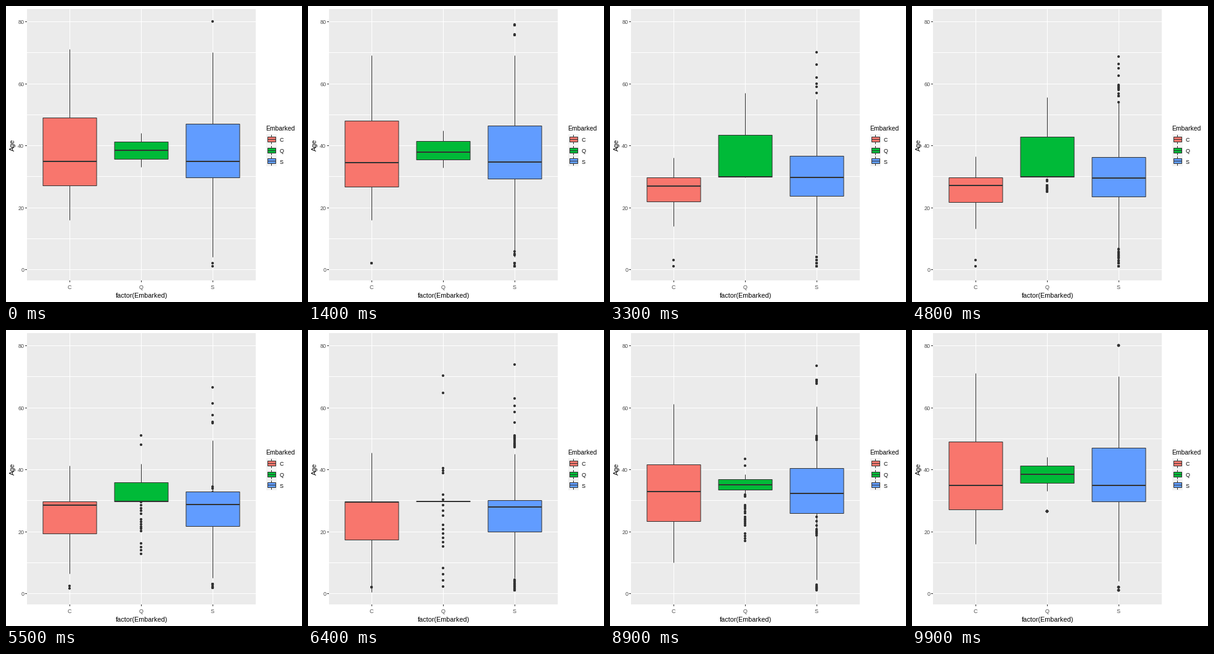
Recreate the animation shown at these times as a matplotlib script. Size 480 px wide and 480 px high, loop 10 s.

```python
import math

import matplotlib.pyplot as plt
import numpy as np
from matplotlib.animation import FuncAnimation
from matplotlib.patches import PathPatch, Rectangle
from matplotlib.path import Path

plt.rcParams["font.family"] = "Liberation Sans"
plt.rcParams["path.snap"] = False  # all lines sit on exact pixel centres

SIZE, DPI = 480, 72
FRAMES, INTERVAL = 100, 100
DARK = "#333333"
NAMES = ["C", "Q", "S"]
FILLS = ["#F8766D", "#00BA38", "#619CFF"]
CENTERS = [103.5 + 116 * i for i in range(3)]
HALF = 43.5
MEAN_AGE = 29.7


def lows(n):
    """Infant ages 1 to 4, over and over."""
    return [1 + i % 4 for i in range(n)]


def runs(*spans):
    """Evenly spaced ages, one (first, last, count) per span."""
    return [age for span in spans for age in np.linspace(*span)]


# Per group, one box per class: low, q1, median, q3, high
STATS = [
    [(16, 27, 35, 49, 71), (14, 22, 27, MEAN_AGE, 36),
     (0.42, 17.25, MEAN_AGE, MEAN_AGE, 45.5)],
    [(33, 35.75, 38.5, 41.25, 44), (MEAN_AGE, 29.85, 30, 43.5, 57),
     (MEAN_AGE,) * 5],
    [(4, MEAN_AGE, 35, 47, 70), (5, 23.75, MEAN_AGE, 36.65, 55),
     (5, 20, 28, 30, 45)],
]
OUTLIERS = [
    [[], [1, 3], []],
    [[], [], runs((2, 8, 4), (15, 22, 6), (25, 32, 5), (39, 40.5, 3),
                  (65, 70.5, 2))],
    [[80, 2, 1],
     [59] + lows(2) + [60, 57] + lows(8) + [70, 66, 62],
     runs((63, 59, 3)) + [51, 74, 55.5] + runs((51, 47, 9)) + lows(18)],
]
# First frame, last frame, class left, class reached
MOVES = [(8, 33, 0, 1), (42, 67, 1, 2), (76, 100, 2, 0)]


def age_y(age):
    return 25.6 + (80 - age) * 5.026


def row(age):
    """Centre of the pixel row that holds an age."""
    return math.floor(age_y(age)) + 0.5


def ease(t):
    return 4 * t ** 3 if t < 0.5 else 1 - 4 * (1 - t) ** 3


def locate(frame):
    """Classes on both sides of the current moment, and eased progress."""
    state = 0
    for start, end, a, b in MOVES:
        if start < frame < end:
            return a, b, ease((frame - start) / (end - start))
        if frame >= end:
            state = b
    return state, state, 0


def mix(a, b, p):
    return [u + (v - u) * p for u, v in zip(a, b)]


def match(values, other):
    """Repeat values to the length of other; an empty list grows from the mean."""
    n = max(len(values), len(other))
    if not values and other:
        values = [sum(other) / len(other)]
    return [values[i % len(values)] for i in range(n)]


fig = plt.figure(figsize=(SIZE / DPI, SIZE / DPI), dpi=DPI, facecolor="white")
ax = fig.add_axes([0, 0, 1, 1])
ax.set_xlim(0, SIZE)
ax.set_ylim(SIZE, 0)
ax.axis("off")


def line(xs, ys, color=DARK, width=1, z=1):
    return ax.plot(xs, ys, color=color, lw=width, zorder=z,
                   solid_capstyle="butt")[0]


def rect(x, y, w, h, fill, edge="none", z=0):
    return ax.add_patch(Rectangle((x, y), w, h, facecolor=fill, edgecolor=edge,
                                  lw=1 if edge != "none" else 0, zorder=z,
                                  joinstyle="miter"))


def label(x, y, text, size, color="black", ha="left", **kw):
    ax.text(x, y, text, fontsize=size, color=color, ha=ha,
            va=kw.pop("va", "baseline"), **kw)


def draw_panel():
    rect(34, 5, 371, 440, "#EBEBEB")
    for age in range(0, 81, 10):
        y = row(age)
        line([34, 405], [y, y], "white")
        if age % 20 == 0:
            line([31, 34], [y, y])
            label(29.3, y + 3.5, str(age), 9, "#4D4D4D", "right")
    for x, name in zip(CENTERS, NAMES):
        line([x, x], [5, 445], "white")
        line([x, x], [445, 448])
        label(x - 0.7, 459, name, 9, "#4D4D4D", "center")
    label(219.5, 473, "factor(Embarked)", 10.7, ha="center")
    label(11, 225.5, "Age", 10.7, ha="center", va="center", rotation=90)


def draw_legend():
    label(421.5, 202, "Embarked", 10.4)
    for i, (name, fill) in enumerate(zip(NAMES, FILLS)):
        top = round(208.3 + 17.28 * i)
        rect(422, top, 17, 17, "#F2F2F2")
        line([430.5, 430.5], [top + 1, top + 16])
        rect(424.5, top + 4.5, 13, 8, fill, DARK, 2)
        line([424, 438], [top + 8.5, top + 8.5], z=3)
        label(444, top + 12.5, name, 9)


class Box:
    def __init__(self, x, fill):
        self.x = x
        self.dots = ax.add_patch(PathPatch(Path(np.empty((0, 2))), lw=0,
                                           facecolor=DARK, zorder=4))
        self.upper = line([x, x], [0, 0], z=5)
        self.lower = line([x, x], [0, 0], z=5)
        self.body = rect(x - HALF, 0, 2 * HALF, 0, fill, DARK, 6)
        self.mid = line([x - HALF, x + HALF], [0, 0], width=2, z=7)

    def pose(self, stats, dots):
        low, q1, med, q3, high = stats
        top, bottom = row(q3), row(q1)
        spots = [Path.circle((self.x - 0.5, math.floor(age_y(d))), 2.1)
                 for d in dots]
        self.dots.set_visible(bool(spots))
        if spots:
            self.dots.set_path(Path.make_compound_path(*spots))
        self.upper.set_ydata([row(high), top])
        self.lower.set_ydata([bottom, row(low)])
        self.body.set_y(top)
        self.body.set_height(bottom - top)
        self.mid.set_ydata([round(age_y(med))] * 2)

    def artists(self):
        return [self.dots, self.upper, self.lower, self.body, self.mid]


draw_panel()
draw_legend()
boxes = [Box(x, fill) for x, fill in zip(CENTERS, FILLS)]


def update(frame):
    a, b, p = locate(frame)
    for box, stats, outs in zip(boxes, STATS, OUTLIERS):
        start, end = match(outs[a], outs[b]), match(outs[b], outs[a])
        box.pose(mix(stats[a], stats[b], p), mix(start, end, p))
    return [art for box in boxes for art in box.artists()]


def init():
    return update(0)


anim = FuncAnimation(fig, update, frames=FRAMES, init_func=init,
                     interval=INTERVAL, repeat=True, repeat_delay=0, blit=False)
plt.show()
```
